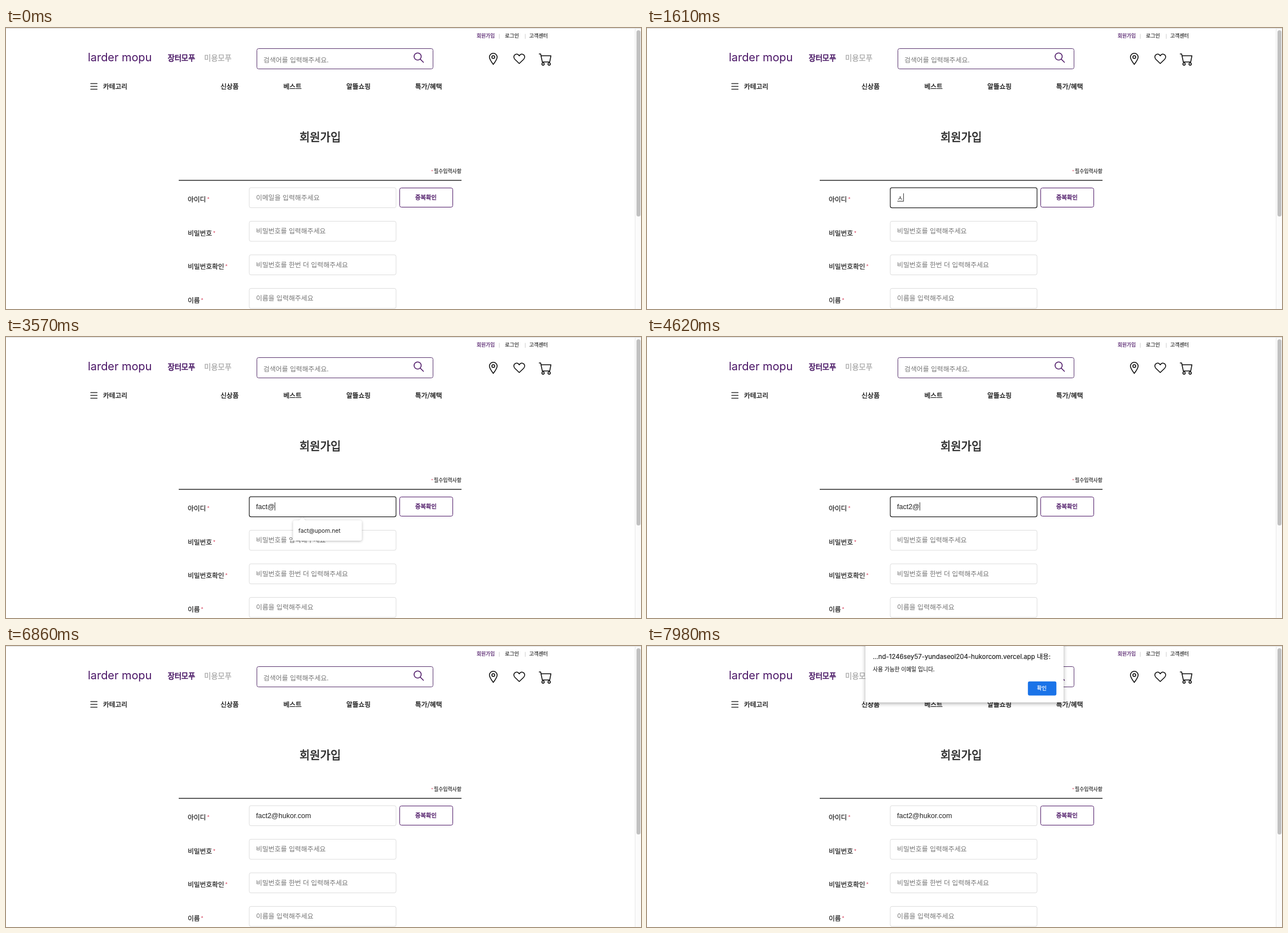
Recreate the animation shown at these times as an HTML page. Size 1125 by 498 pixels, loop 8000 ms.

```html
<!DOCTYPE html>
<html lang="ko">
<head>
<meta charset="utf-8">
<title>회원가입</title>
<style>
  html, body { margin: 0; width: 100%; height: 100%; overflow: hidden; background: #fff; }
  svg { display: block; width: 1125px; height: 498px; }
  text { font-family: "Noto Sans CJK KR", "Noto Sans CJK JP", "Noto Sans CJK", sans-serif; white-space: pre; }
  .ui { font-family: Inter, "Noto Sans CJK KR", "Noto Sans CJK JP", sans-serif; }
  .typed { font-family: "Liberation Sans", "Noto Sans CJK KR", sans-serif; }
  .icon { fill: none; stroke: #111; stroke-width: 1.6; stroke-linecap: round; stroke-linejoin: round; }
  .shade { filter: drop-shadow(0 1px 2px rgba(0, 0, 0, .28)); }
</style>
</head>
<body>
<svg viewBox="0 0 1125 498" xmlns="http://www.w3.org/2000/svg">
  <path d="M0 .5H1125" stroke="#d9d9d9"/>
  <g id="page"></g>

  <path class="icon" style="stroke-width:1.3;stroke:#333" d="M150 98.500H161.500M150 103.500H161.500M150 108.500H161.500"/>
  <g class="icon" style="stroke:#4f1a68">
    <circle cx="729.300" cy="50.500" r="6.300"/>
    <path d="M734 55.300L739.500 60.800"/>
  </g>
  <g class="icon">
    <path d="M863.300 64.500C859.500 59.500 856.500 55.500 856.500 51.500A6.800 6.800 0 0 1 870.100 51.500C870.100 55.500 867.100 59.500 863.300 64.500Z"/>
    <circle cx="863.300" cy="51.500" r="2.500"/>
    <path d="M909.300 63L901.500 55.500C898.600 52.500 899.300 48 902.700 46.700C905.400 45.700 908 47 909.300 49.400C910.600 47 913.200 45.700 915.900 46.700C919.300 48 920 52.500 917.100 55.500Z"/>
    <path d="M944.700 46H947.200L950.200 60.300H963.200L965.400 49.300H948"/>
    <circle cx="951.500" cy="63.800" r="2.100"/>
    <circle cx="962.300" cy="63.800" r="2.100"/>
  </g>

  <path d="M306 270H807" stroke="#2b2b2b" stroke-width="1.600"/>
  <rect x="1114.500" y="1" width="12" height="498" fill="#fbfbfb" stroke="#e8e8e8"/>
  <rect x="1117" y="4" width="7" height="330" rx="3.500" fill="#c1c1c1"/>

  <g id="entry"></g>
  <path id="underline" stroke="#222"/>
  <path id="caret" d="M0 293V307.500" stroke="#222" stroke-width=".9"/>

  <g id="popup">
    <g class="shade" fill="#fff">
      <rect id="popupBox" x="508.500" y="325" width="122" rx="3.500"/>
      <path d="M518.500 325.500L524.800 319.500L531 325.500Z"/>
    </g>
  </g>

  <path id="ghost" d="M395 0H729L738 97H384Z" fill="#fff" stroke="#e6e6e6"/>
  <g id="dialog">
    <rect id="sheet" y="-10"/>
    <g id="dialogBody">
      <rect x="674.800" y="62.700" width="50.500" height="25" rx="3" fill="#1a73e8"/>
    </g>
  </g>
</svg>
<script>
const LOOP = 8000;
const PURPLE = '#4f1a68', INK = '#222', HINT = '#757575', RED = '#d9506a';
const $ = id => document.getElementById(id);

function set(el, attrs) {
  for (const key in attrs) el.setAttribute(key, attrs[key]);
  return el;
}

function add(parent, tag, attrs, content = '') {
  const el = set(document.createElementNS('http://www.w3.org/2000/svg', tag), attrs);
  el.textContent = content;
  return parent.appendChild(el);
}

// Places text by its left edge and vertical middle; bold is a thin outline width.
function label(parent, content, x, mid, size, fill = INK, bold = 0, cls = '') {
  return add(parent, 'text', {
    x, y: mid + size * .38, 'font-size': size, fill,
    stroke: bold ? fill : 'none', 'stroke-width': bold, class: cls
  }, content);
}

function box(parent, x, y, width, height, stroke) {
  return add(parent, 'rect', { x, y, width, height, rx: 3, fill: '#fff', stroke });
}

const page = $('page');
label(page, '회원가입', 833.7, 14, 8.8, PURPLE, .2);
label(page, '로그인', 884, 14, 9, INK, .2);
label(page, '고객센터', 927, 14, 8.95, INK, .2);
for (const x of [874, 920]) add(page, 'path', { d: `M${x} 10.5V19`, stroke: '#ccc' });

label(page, 'larder mopu', 145, 51.5, 19.9, '#4a1566', 0, 'ui');
label(page, '장터모푸', 286.5, 53, 13.2, '#431060', .55);
label(page, '미용모푸', 351, 53, 13.2, '#aaa', .35);
box(page, 444.5, 36.5, 312, 36, '#5b3570');
label(page, '검색어를 입력해주세요.', 456, 56, 11.85, HINT);

for (const [name, x] of [['카테고리', 172], ['신상품', 380], ['베스트', 491.5], ['알뜰쇼핑', 603], ['특가/혜택', 725]])
  label(page, name, x, 104, 11.65, '#1a1a1a', .35);

label(page, '회원가입', 520, 193, 19.9, '#2b2b2b', .65);
label(page, '*', 753, 255, 8.5, RED);
label(page, '필수입력사항', 758, 254, 8.85, INK, .15);

const fields = [
  ['아이디', '이메일을 입력해주세요', 356],
  ['비밀번호', '비밀번호를 입력해주세요', 366.5],
  ['비밀번호확인', '비밀번호를 한번 더 입력해주세요', 388],
  ['이름', '이름을 입력해주세요', 345]
];
let idBox, idHint;
fields.forEach(([name, hint, starX], i) => {
  const y = 283 + i * 59.5;
  label(page, name, 322, y + 21, 11.7, INK, .25);
  label(page, '*', starX, y + 21.5, 10.5, RED);
  const frame = box(page, 431, y, 260, 35.5, '#ddd');
  const text = label(page, hint, 443, y + 17, 11.88, HINT);
  if (!i) [idBox, idHint] = [frame, text];
});
box(page, 697.5, 283.5, 94, 34, PURPLE);
label(page, '중복확인', 725, 300, 10.3, PURPLE, .4);

const entry = label($('entry'), '', 443, 299.8, 12.5, INK, 0, 'typed');
label($('popup'), 'fact@upom.net', 518, 343, 10.3, INK, 0, 'ui');
const second = label($('popup'), 'demo@upom.net', 518, 371, 10.3, INK, 0, 'ui');

const body = $('dialogBody');
label(body, '...nd-1246sey57-yundaseol204-hukorcom.vercel.app 내용:', 400, 19, 11.4, INK, .2, 'ui');
label(body, '사용 가능한 이메일 입니다.', 400, 41.7, 9.75, INK, .1);
label(body, '확인', 691, 75, 9.2, '#fff', .25);

// time, typed text, focused, caret shown, popup rows
const typing = [
  [0, '', 0, 0, 0],
  [910, '', 1, 1, 0],
  [980, '', 1, 1, 2],
  [1400, '', 1, 0, 2],
  [1610, 'ㅅ', 1, 1, 0],
  [1820, 'ㅅㄷ', 1, 1, 0],
  [2170, 'ㅅ', 1, 1, 0],
  [2310, '', 1, 1, 0],
  [2660, 'f', 1, 1, 1],
  [2800, 'fa', 1, 1, 1],
  [3010, 'fac', 1, 1, 1],
  [3220, 'fact', 1, 1, 1],
  [3570, 'fact@', 1, 1, 1],
  [4060, 'fact', 1, 1, 1],
  [4130, 'fact2', 1, 1, 0],
  [4620, 'fact2@', 1, 1, 0],
  [4970, 'fact2@h', 1, 1, 0],
  [5040, 'fact2@hu', 1, 1, 0],
  [5180, 'fact2@huk', 1, 1, 0],
  [5320, 'fact2@huko', 1, 1, 0],
  [5530, 'fact2@hukor.', 1, 1, 0],
  [5670, 'fact2@hukor.c', 1, 1, 0],
  [5740, 'fact2@hukor.co', 1, 1, 0],
  [5880, 'fact2@hukor.com', 1, 1, 0],
  [6440, 'fact2@hukor.com', 1, 0, 0],
  [6860, 'fact2@hukor.com', 0, 0, 0]
];
// time, opacity, scale, vertical shift
const opening = [
  [0, 0, 1, 0],
  [7770, .28, .97, -8],
  [7840, .7, .988, -4.3],
  [7910, .95, .997, -1],
  [7980, 1, 1, 0]
];

const at = (steps, t) => steps.findLast(step => step[0] <= t);
const show = (el, on) => el.style.display = on ? '' : 'none';

function drawTyping([, text, focus, caret, rows]) {
  const composing = text.startsWith('ㅅ');
  entry.textContent = text;
  set(entry, { 'font-size': composing ? 11.88 : 12.5 });
  set(idBox, { stroke: focus ? '#222' : '#ddd', 'stroke-width': focus ? 1.25 : 1 });
  show(idHint, !text);
  show($('underline'), composing);
  set($('underline'), { d: `M443.5 307H${443 + 11 * text.length}` });
  show($('caret'), caret);
  const end = text ? entry.getComputedTextLength() : 0;
  set($('caret'), { transform: `translate(${443.6 + end} 0)` });
  show($('popup'), rows);
  show(second, rows > 1);
  set($('popupBox'), { height: 8 + 28 * rows });
}

function drawDialog([, opacity, scale, dy]) {
  const done = opacity === 1;
  const inset = done ? 0 : 6;
  show($('dialog'), opacity);
  show($('ghost'), opacity && !done);
  set($('ghost'), { opacity: opacity * .7 });
  set($('dialog'), { transform: `translate(562.5 ${dy}) scale(${scale}) translate(-562.5 0)` });
  set($('sheet'), {
    x: 387 + inset, width: 351 - 2 * inset, height: 110 - inset,
    rx: done ? 3 : 9, fill: done ? '#fff' : '#eff2f2', opacity
  });
  $('sheet').style.filter = done ? 'drop-shadow(0 2px 3.5px rgba(0,0,0,.33))' : 'none';
  set(body, { opacity });
}

let lastTyping, lastOpening;
const start = performance.now();
function frame() {
  const t = (performance.now() - start) % LOOP;
  const typed = at(typing, t), opened = at(opening, t);
  if (typed !== lastTyping) drawTyping(lastTyping = typed);
  if (opened !== lastOpening) drawDialog(lastOpening = opened);
  requestAnimationFrame(frame);
}
frame();
</script>
</body>
</html>
```
